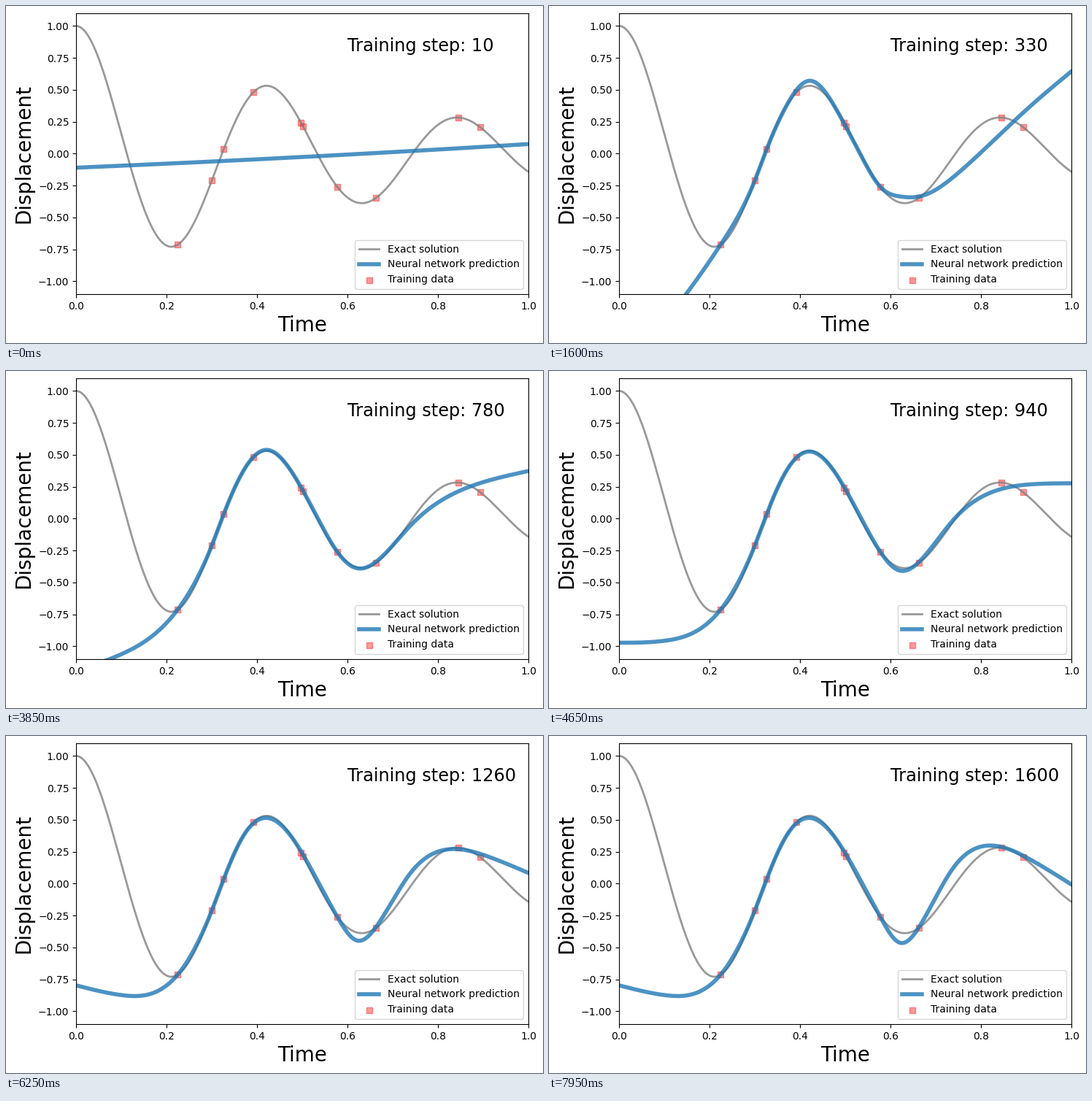
A matplotlib script that plays this animation: 736 by 462 pixels, repeating every 8000 ms.

```python
import numpy as np
import matplotlib.pyplot as plt
from matplotlib.animation import FuncAnimation

W, H, DPI = 736, 462, 100
FRAMES, INTERVAL = 160, 50

plt.rcParams["font.family"] = "DejaVu Sans"


def oscillator(x, d=1.5, w0=15):
    """Underdamped oscillator released from rest at 1."""
    w = np.sqrt(w0 ** 2 - d ** 2)
    phi = np.arctan(-d / w)
    return np.exp(-d * x) * np.cos(phi + w * x) / np.cos(phi)


def natural_spline(xk, yk, x):
    """Natural cubic spline through (xk, yk), evaluated at x."""
    h = np.diff(xk)
    n = len(xk)
    a, b = np.eye(n), np.zeros(n)
    for i in range(1, n - 1):
        a[i, i - 1:i + 2] = h[i - 1], 2 * (h[i - 1] + h[i]), h[i]
        b[i] = 6 * ((yk[i + 1] - yk[i]) / h[i] - (yk[i] - yk[i - 1]) / h[i - 1])
    m = np.linalg.solve(a, b)
    i = np.clip(np.searchsorted(xk, x, side="right") - 1, 0, n - 2)
    p, q = xk[i + 1] - x, x - xk[i]
    return ((m[i] * p ** 3 + m[i + 1] * q ** 3) / (6 * h[i])
            + (yk[i] / h[i] - m[i] * h[i] / 6) * p
            + (yk[i + 1] / h[i] - m[i + 1] * h[i] / 6) * q)


def ramp(step, start, length):
    return np.clip((step - start) / length, 0, 1)


def smooth(u):
    return u * u * (3 - 2 * u)


x = np.linspace(0, 1, 500)
x_data = np.array([.2242, .3003, .3264, .392, .4968, .5016, .5774, .663, .845, .8935])

# The fit is pinned to the oscillator here and bends through guides elsewhere
pins = np.array([.2242, .3, .3258, .37, .48, .5774])
guides = np.array([0, .1, .42, .54, .62, .67, .74, .815, .91, 1])
rough = np.array([-1.75, -1.33, .572, -.05, -.335, -.33, -.18, .06, .375, .645])
settled = np.array([-.797, -.873, .515, -.015, -.462, -.3, .13, .298, .187, -.007])

knots = np.concatenate([pins, guides])
order = np.argsort(knots)
start_line = -.11 + .15 * x + .035 * x ** 2


def prediction(step):
    # The left side settles sooner than the right
    left = smooth(ramp(step, 250, 950))
    right = ramp(step, 330, 1080)
    progress = np.where(guides < .5, left, right)
    bends = rough + (settled - rough) * progress
    heights = np.concatenate([oscillator(pins), bends])
    fit = natural_spline(knots[order], heights[order], x)
    onset = ramp(step, 10, 320) ** 1.8
    return start_line + (fit - start_line) * onset


fig = plt.figure(figsize=(W / DPI, H / DPI), dpi=DPI, facecolor="white")
ax = fig.add_axes([96.1 / W, 67.1 / H, 620 / W, 385 / H])
ax.plot(x, oscillator(x), color="grey", lw=2, alpha=.8, label="Exact solution")
fit_line, = ax.plot(x, prediction(10), color="tab:blue", lw=4, alpha=.8,
                    label="Neural network prediction")
ax.scatter(x_data, oscillator(x_data), s=30, marker="s", color="red", alpha=.4,
           label="Training data")
ax.set_xlim(0, 1)
ax.set_ylim(-1.1, 1.1)
ax.set_xlabel("Time", fontsize=20)
ax.set_ylabel("Displacement", fontsize=20)
ax.legend(loc="lower right")
caption = ax.text(.6, .8, "", fontsize="xx-large")


def update(frame):
    step = 10 * (frame + 1)
    fit_line.set_ydata(prediction(step))
    caption.set_text(f"Training step: {step}")
    return fit_line, caption


anim = FuncAnimation(fig, update, frames=FRAMES, interval=INTERVAL,
                     repeat=True, repeat_delay=0)
plt.show()
```
